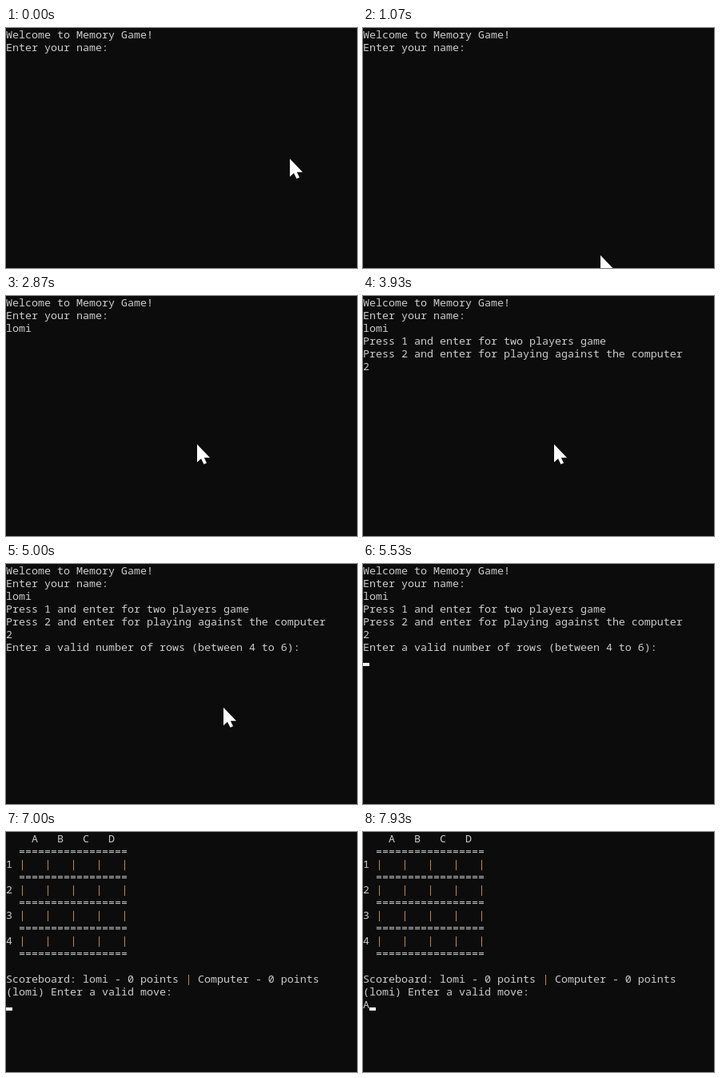
Animation, 439 px wide and 301 px high, one loop 8000 ms. Source, as an HTML page with a canvas:

```html
<!DOCTYPE html>
<html lang="en">
<head>
<meta charset="utf-8">
<title>Memory Game</title>
<style>
  html, body { margin: 0; width: 100%; height: 100%; overflow: hidden; background: #0c0c0c; }
  canvas { display: block; }
</style>
</head>
<body>
<canvas id="stage" width="439" height="301"></canvas>
<script>
const ctx = document.getElementById('stage').getContext('2d', { alpha: false });
const LOOP = 8000, COL = 8, ROW = 16, BASE = 13;
const PLAYER = 'lomi';

const rule = '  ' + '='.repeat(17) + '\n';
const board = '    A   B   C   D\n' + rule +
  [1, 2, 3, 4].map(n => n + ' |' + '   |'.repeat(4) + '\n' + rule).join('');

// [time, appended output, cursor visible]; \f clears the screen
const script = [
  [0, 'Welcome to Memory Game!\nEnter your name:\n', false],
  [1800, '', true],
  ...[2200, 2270, 2400, 2470].map((t, i) => [t, PLAYER[i], true]),
  [2870, '', false],
  [3000, '\nPress 1 and enter for two players game\n' +
         'Press 2 and enter for playing against the computer\n', true],
  [3730, '2', true],
  [3930, '', false],
  [4330, '\nEnter a valid number of rows (between 4 to 6):\n', true],
  [5000, '', false],
  [5530, '', true],
  [5930, '4', true],
  [6070, '', false],
  [6270, '\nEnter a valid number of columns (between 4 to 6):\n', true],
  [6670, '4', true],
  [6930, '\n', true],
  [7000, '\f' + board + `\nScoreboard: ${PLAYER} - 0 points | Computer - 0 points\n` +
         `(${PLAYER}) Enter a valid move:\n`, true],
  [7670, '', false],
  [7930, 'A', true]
];

function terminalAt(t) {
  let text = '', cursor = false;
  for (const [start, out, on] of script) {
    if (start > t) break;
    text = out[0] === '\f' ? out.slice(1) : text + out;
    cursor = on;
  }
  return { lines: text.split('\n'), cursor };
}

// Pointer tip, or null while it is outside the window
function pointerAt(t) {
  if (t < 70) return [355, 164];
  if (t < 130) return [390, 179];
  if (t < 1070) return null;
  if (t < 5000) {
    const step = Math.min(5, Math.floor((t - 1070 + 6) / 66.7));
    const left = (1 - step / 5) ** 2;
    return [Math.round(239 + 58 * left), Math.round(186 + 99 * left)];
  }
  if (t < 5070) return [272, 180];
  if (t < 5130) return [349, 162];
  return null;
}

function drawTerminal({ lines, cursor }) {
  ctx.font = '13.3333px "Noto Sans Mono", "DejaVu Sans Mono", monospace';
  ctx.textBaseline = 'alphabetic';
  lines.forEach((line, row) => {
    const y = row * ROW + BASE;
    ctx.fillStyle = '#cccccc';
    ctx.fillText(line.replace(/\|/g, ' '), 0, y);
    ctx.fillStyle = '#c58a4c';
    for (let i = line.indexOf('|'); i >= 0; i = line.indexOf('|', i + 1)) {
      ctx.fillText('|', i * COL + 0.5, y);
    }
  });
  if (cursor) {
    const row = lines.length - 1;
    ctx.fillStyle = '#f2f2f2';
    ctx.fillRect(lines[row].length * COL, row * ROW + 12, COL, 4);
  }
}

const arrow = new Path2D('M0 0V22.5L5 18L8.5 25L12 23.5L8.8 16.8H16Z');

function drawPointer([x, y]) {
  ctx.save();
  ctx.translate(x, y);
  ctx.fillStyle = '#fff';
  ctx.fill(arrow);
  ctx.restore();
}

function draw(now) {
  const t = now % LOOP;
  ctx.fillStyle = '#0c0c0c';
  ctx.fillRect(0, 0, 439, 301);
  drawTerminal(terminalAt(t));
  const tip = pointerAt(t);
  if (tip) drawPointer(tip);
}

let begin;
function tick(now) {
  begin ??= now;
  draw(now - begin);
  requestAnimationFrame(tick);
}
draw(0);
requestAnimationFrame(tick);
</script>
</body>
</html>
```
